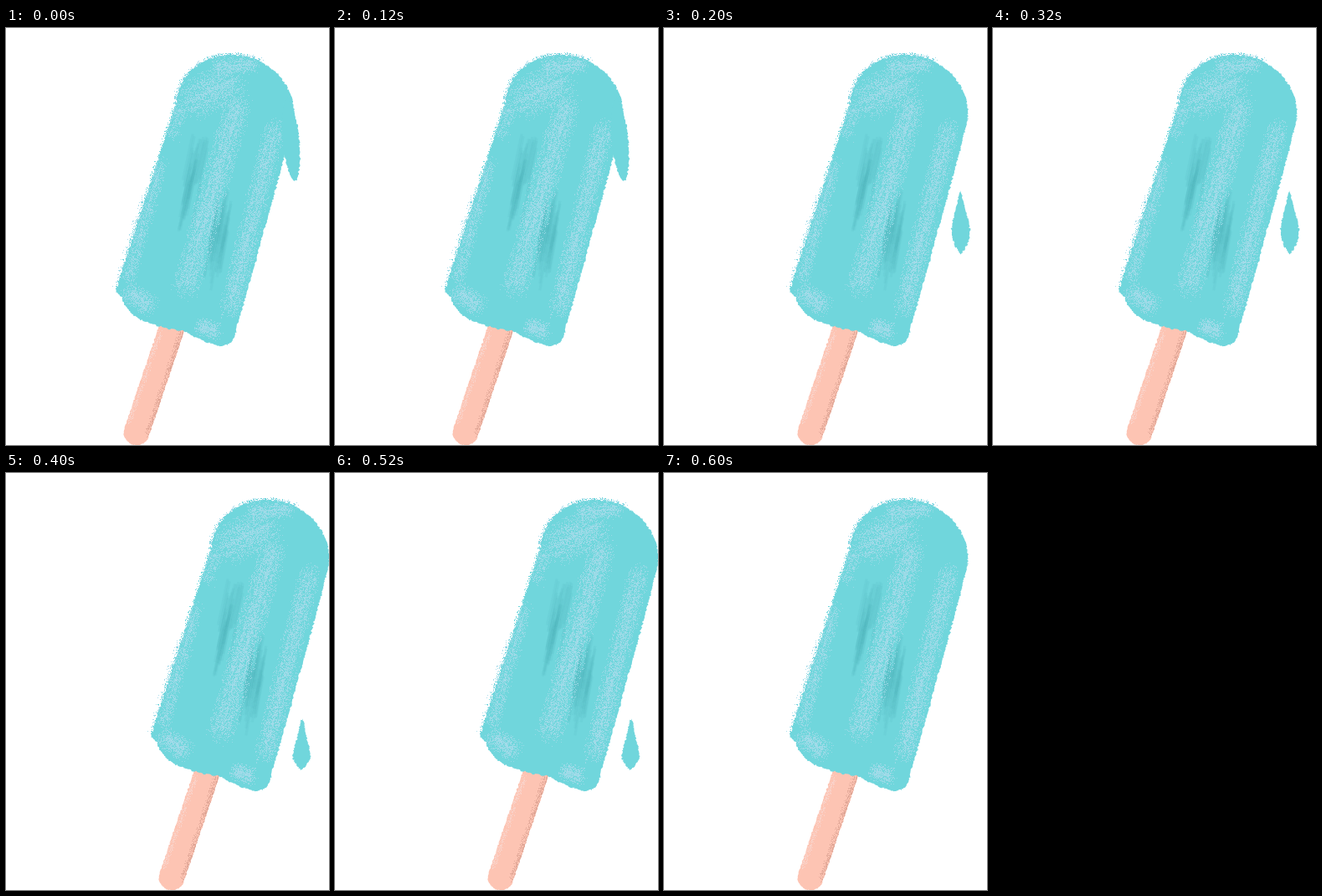
Animation of 386 by 498 pixels, one loop 800 ms. Source, as an HTML page with a canvas:

```html
<!DOCTYPE html>
<html lang="en">
<head>
<meta charset="utf-8">
<title>Melting ice lolly</title>
<style>
  html, body { margin: 0; width: 100%; height: 100%; overflow: hidden; background: #fff; }
  canvas { display: block; width: 386px; height: 498px; }
</style>
</head>
<body>
<canvas id="stage" width="386" height="498"></canvas>
<script>
const W = 386, H = 498, STEP = 200;
const ICE = '#70d6dc', FROST = '#a6dbea', SHADE = '#4fb2bb';

// One pose per step: sideways shift of the lolly and its drip.
const POSES = [
  { shift: 0, drip: { x: 336, y: 84, lean: 9, length: 100, belly: 2, stem: 8, low: 1 } },
  { shift: 19, drip: { x: 354, y: 194, lean: 1, length: 76, belly: 9, stem: 2, low: 1.6 } },
  { shift: 42, drip: { x: 354, y: 294, lean: -1, length: 60, belly: 7, stem: 4, low: 2.4 } },
  { shift: 19 }
];

function makeRandom(seed) {
  return () => {
    seed = (seed + 0x6d2b79f5) | 0;
    let t = Math.imul(seed ^ (seed >>> 15), 1 | seed);
    t = (t + Math.imul(t ^ (t >>> 7), 61 | t)) ^ t;
    return ((t ^ (t >>> 14)) >>> 0) / 4294967296;
  };
}
const rnd = makeRandom(71);
const spread = () => rnd() + rnd() - 1;
const mix = (a, b, t) => a + (b - a) * t;

// Points of f(t) for t from 0 to 1.
const trace = (f, count) => Array.from({ length: count }, (_, i) => f(i / count));

const bend = (a, c, b) => t => [0, 1].map(j => mix(mix(a[j], c[j], t), mix(c[j], b[j], t), t));
const line = (a, b) => t => [0, 1].map(j => mix(a[j], b[j], t));

// Half an ellipse, tilted like the lolly.
function crown(t) {
  const c = Math.cos(Math.PI * t), s = Math.sin(Math.PI * t);
  return [274 - 70 * c + 6 * s, 97 - 9.5 * c - 64 * s];
}

function ragged(points, rough) {
  const path = new Path2D();
  for (const [x, y] of points) path.lineTo(x + spread() * rough, y + spread() * rough);
  path.closePath();
  return path;
}

function bodyPath() {
  const shoulder = [344, 106], corner = [275, 360], lip = [250, 378.5];
  const notch = [212, 361.5], heel = [139, 322], tip = [131, 314];
  return ragged([
    ...trace(crown, 170),
    ...trace(bend(shoulder, [338, 140], corner), 200),
    ...trace(bend(corner, [272, 384], lip), 30),
    ...trace(bend(lip, [232, 374], notch), 34),
    ...trace(bend(notch, [145, 354], heel), 70),
    ...trace(line(heel, tip), 9),
    ...trace(line(tip, crown(0)), 180)
  ], 1.4);
}

function stickPath() {
  const r = 15.3, tilt = 0.325;
  const rim = (x, y) => t => {
    const a = tilt + Math.PI * t;
    return [x + r * Math.cos(a), y + r * Math.sin(a)];
  };
  const end = rim(156, 483), top = rim(201, 350);
  return ragged([
    ...trace(line(top(0), end(0)), 100),
    ...trace(end, 40),
    ...trace(line(end(1), top(1)), 100)
  ], 0.8);
}

function dripPath({ x, y, lean, length, belly, stem, low }) {
  const side = sign => t => {
    const half = belly * Math.sin(Math.PI * t ** low) + stem * 2 * Math.sqrt(t * (1 - t));
    return [x + lean * t + sign * half, y + length * t];
  };
  const left = side(-1);
  return ragged([...trace(side(1), 70), ...trace(t => left(1 - t), 70)], 1.4);
}

// Chalk stroke of single-pixel grains, denser along a few streaks.
function chalk(g, [x1, y1], [x2, y2], width, cover, color, alpha) {
  const len = Math.hypot(x2 - x1, y2 - y1);
  const nx = (y2 - y1) / len, ny = (x1 - x2) / len;
  g.fillStyle = color;
  g.globalAlpha = alpha;
  for (let i = len * width * cover; i > 0; i--) {
    const along = rnd() + spread() * (0.03 + 0.4 * width / len);
    const d = spread() * 0.68;
    if (rnd() > 0.75 + 0.25 * Math.sin(d * 22 + along * 2)) continue;
    g.fillRect(Math.round(mix(x1, x2, along) + nx * d * width),
               Math.round(mix(y1, y2, along) + ny * d * width), 1, 1);
  }
  g.globalAlpha = 1;
}

// Soft shadow built from thin parallel pencil lines.
function hatch(g, [x1, y1], [x2, y2], width, count) {
  g.strokeStyle = SHADE;
  g.globalAlpha = 0.13;
  g.lineWidth = 3;
  for (let i = 0; i < count; i++) {
    const from = rnd() * 0.5, to = from + 0.35 + rnd() * 0.15, d = spread() * width * 0.6;
    g.beginPath();
    g.moveTo(mix(x1, x2, from) + d, mix(y1, y2, from) + d * 0.3);
    g.lineTo(mix(x1, x2, to) + d, mix(y1, y2, to) + d * 0.3);
    g.stroke();
  }
  g.globalAlpha = 1;
}

function clipped(g, path, color, paint) {
  g.fillStyle = color;
  g.fill(path);
  g.save();
  g.clip(path);
  paint();
  g.restore();
}

function paintStick(g) {
  clipped(g, stickPath(), '#fdc4b3', () => {
    chalk(g, [211, 362], [170, 486], 9, 1.1, '#dba090', 0.6);
    chalk(g, [184, 362], [146, 472], 6, 0.7, '#f8d7d0', 0.7);
  });
}

function paintBody(g) {
  // Loose grains beyond the crown and the left side.
  for (let i = 0; i < 700; i++) {
    const [x, y] = crown(rnd() * 0.62);
    g.fillStyle = rnd() < 0.6 ? FROST : ICE;
    g.fillRect(Math.round(x + spread() * 5), Math.round(y + spread() * 5), 1, 1);
  }
  chalk(g, [203, 92], [134, 308], 7, 0.5, ICE, 1);
  chalk(g, [168, 200], [136, 304], 12, 0.35, FROST, 0.9);

  clipped(g, bodyPath(), ICE, () => {
    hatch(g, [234, 128], [207, 256], 20, 34);
    hatch(g, [264, 192], [242, 316], 24, 42);
    const frost = (from, to, width, cover) => chalk(g, from, to, width, cover, FROST, 0.75);
    frost([277, 88], [214, 312], 27, 1);
    frost([321, 118], [267, 336], 22, 0.95);
    frost([218, 88], [272, 62], 40, 0.95);
    frost([250, 45], [296, 44], 16, 1.2);
    frost([208, 92], [196, 128], 20, 0.6);
    frost([184, 160], [145, 300], 16, 0.7);
    frost([146, 314], [172, 332], 22, 1.3);
    frost([230, 355], [252, 361], 18, 1.6);
  });
}

const lolly = document.createElement('canvas');
lolly.width = W;
lolly.height = H;
const ink = lolly.getContext('2d');
paintStick(ink);
paintBody(ink);

const drips = POSES.map(({ drip }) => drip && dripPath(drip));
const stage = document.getElementById('stage').getContext('2d');

function draw(ms) {
  const i = Math.floor(ms / STEP) % POSES.length;
  stage.fillStyle = '#fff';
  stage.fillRect(0, 0, W, H);
  stage.drawImage(lolly, POSES[i].shift, 0);
  if (drips[i]) {
    stage.fillStyle = ICE;
    stage.fill(drips[i]);
  }
}

const start = performance.now();
function tick() {
  draw(performance.now() - start);
  requestAnimationFrame(tick);
}
tick();
</script>
</body>
</html>
```
